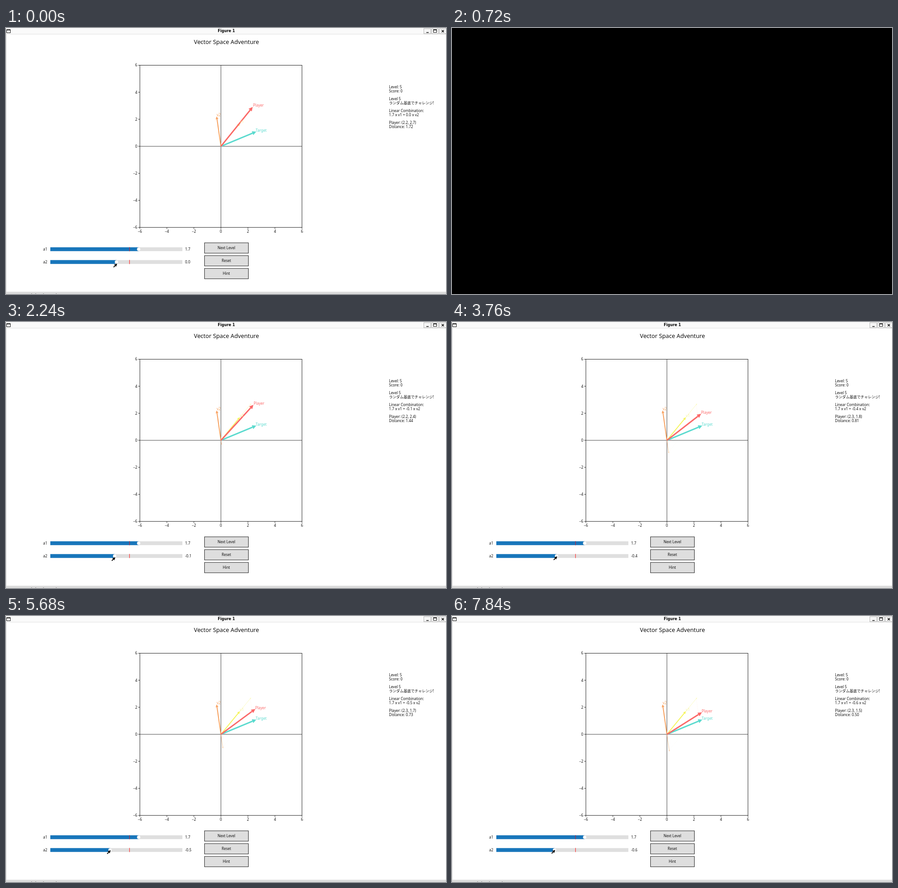
Write an HTML page with a canvas that moves like this. It is 963 px wide and 582 px high and loops after 8000 ms.

```html
<!DOCTYPE html>
<html lang="en">
<head>
<meta charset="utf-8">
<title>Vector sliders</title>
<style>
html, body { margin: 0; width: 100%; height: 100%; overflow: hidden; background: #fff; }
canvas { display: block; }
</style>
</head>
<body>
<canvas id="stage" width="963" height="582"></canvas>
<script>
const ctx = document.getElementById('stage').getContext('2d');
const SANS = '"Noto Sans", "Noto Sans CJK JP", "Noto Sans CJK", sans-serif';
const LOOP = 8000, STEP = 80;
const CORAL = '#fb6868', TEAL = '#5adace', ORANGE = '#f8a05e', YELLOW = '#f5f560';

// Plot geometry: origin and pixels per unit
const OX = 470.4, OY = 258.9, UNIT = 29.57;
const px = x => OX + x * UNIT;
const py = y => OY - y * UNIT;

const a1 = 1.7;
const v1 = [1.2765, 1.5535], v2 = [-0.29, 2.015], target = [2.34, 0.97];

// Each drag of the second slider: start, end, value reached
const drags = [
  [1840, 2080, -0.1177],
  [3120, 3440, -0.4276],
  [4880, 5040, -0.4673],
  [6000, 6320, -0.581]
];

function sliderValue(t) {
  let value = 0.02;
  for (const [start, end, goal] of drags) {
    const k = Math.min(1, Math.max(0, (t - start + STEP) / (end - start + STEP)));
    value += (goal - value) * k;
  }
  return value;
}

function text(str, x, y, { size = 8, align = 'left', color = '#111', font = SANS, weight = 400 } = {}) {
  ctx.font = `${weight} ${size}px ${font}`;
  ctx.textAlign = align;
  ctx.fillStyle = color;
  ctx.fillText(str, x, y);
}

function rect(x, y, w, h, fill, stroke) {
  if (fill) { ctx.fillStyle = fill; ctx.fillRect(x, y, w, h); }
  if (stroke) { ctx.strokeStyle = stroke; ctx.lineWidth = 1; ctx.strokeRect(x, y, w, h); }
}

function line(x1, y1, x2, y2, color, width = 1) {
  ctx.strokeStyle = color;
  ctx.lineWidth = width;
  ctx.beginPath();
  ctx.moveTo(x1, y1);
  ctx.lineTo(x2, y2);
  ctx.stroke();
}

function shape(points, fill) {
  ctx.beginPath();
  points.forEach(([x, y]) => ctx.lineTo(x, y));
  ctx.closePath();
  ctx.fillStyle = fill;
  ctx.fill();
}

// The head starts where the vector ends, so the tip lies beyond it
function arrow([x, y], color, width, head, alpha = 1) {
  const len = Math.hypot(x, y);
  if (len < 0.05) return;
  const ux = x / len, uy = y / len, h = head / 2;
  ctx.globalAlpha = alpha;
  line(OX, OY, px(x), py(y), color, width);
  shape([
    [px(x + ux * head), py(y + uy * head)],
    [px(x - uy * h), py(y + ux * h)],
    [px(x + uy * h), py(y - ux * h)]
  ], color);
  ctx.globalAlpha = 1;
}

const label = (str, [x, y], color) => text(str, px(x * 1.1), py(y * 1.1), { color });

function drawWindow() {
  rect(0, 0, 963, 582, '#fff');
  rect(0, 0, 963, 13, '#fafafa');
  rect(0, 13, 963, 1, '#e2e2e2');
  rect(0, 13, 1, 569, '#d8d8d8');
  rect(0, 577, 963, 5, '#dcdcdc');
  for (const x of [55, 64, 81, 109]) rect(x, 581, 2, 1, '#888');
  rect(1.5, 3.5, 8, 7, '#fff', '#111');
  rect(1, 3, 9, 2, '#111');
  text('Figure 1', 482.3, 9.3, { align: 'center', color: '#000', weight: 700, font: '"DejaVu Sans", sans-serif' });
  for (const x of [914.5, 931.5, 948.5]) rect(x, 1.5, 15, 11, '#f6f6f6', '#b5b5b5');
  rect(920, 9, 5, 1.5, '#111');
  rect(935.5, 3.5, 7, 6, null, '#111');
  rect(935, 3, 8, 2, '#111');
  line(953.5, 4.5, 958.5, 9.5, '#111', 1.5);
  line(958.5, 4.5, 953.5, 9.5, '#111', 1.5);
  text('Vector Space Adventure', 482.5, 35.3, { size: 12.75, align: 'center' });
}

function drawAxes() {
  line(px(-6), OY, px(6), OY, '#444');
  line(OX, py(-6), OX, py(6), '#444');
  rect(293, 81.5, 354.8, 354.8, null, '#222');
  for (let n = -6; n <= 6; n += 2) {
    const str = String(n).replace('-', '−');
    line(px(n), 436.5, px(n), 439.5, '#222');
    line(289.5, py(n), 293, py(n), '#222');
    text(str, px(n), 447.8, { align: 'center' });
    text(str, 287.3, py(n) + 3, { align: 'right' });
  }
}

const knobX = value => 241.5 + value * 28.9;

function drawSlider(name, value, y) {
  const x = knobX(value);
  rect(97, y - 4.2, 289, 8.4, '#dfdfdf');
  rect(97, y - 4.2, x - 97, 8.4, '#1876bb');
  line(knobX(1), y - 4.4, knobX(1), y + 4.4, value > 1 ? '#c0283c' : '#f33', 1.2);
  ctx.beginPath();
  ctx.arc(x, y, 3.8, 0, Math.PI * 2);
  ctx.fillStyle = '#fff';
  ctx.fill();
  ctx.strokeStyle = '#d8d8d8';
  ctx.lineWidth = 0.7;
  ctx.stroke();
  text(name, 90.3, y + 2.7, { align: 'right' });
  text(value.toFixed(1), 392, y + 2.7);
}

function drawButtons() {
  ['Next Level', 'Reset', 'Hint'].forEach((name, i) => {
    const y = 470 + i * 28;
    rect(434.5, y, 96, 22.7, '#dedede', '#222');
    text(name, 482.3, y + 14, { align: 'center' });
  });
}

function drawVectors(a2, player) {
  const part1 = v1.map(c => c * a1), part2 = v2.map(c => c * a2);
  ctx.globalAlpha = 0.15;
  ctx.setLineDash([2, 2]);
  for (const [[x, y], color] of [[part1, ORANGE], [part2, '#d8d8a0']])
    line(px(x), py(y), px(player[0]), py(player[1]), color, 0.8);
  ctx.setLineDash([]);
  ctx.globalAlpha = 1;
  arrow(v1, YELLOW, 2, 0.2);
  arrow(v2, ORANGE, 2, 0.2);
  arrow(part1, YELLOW, 1, 0.1, 0.4);
  arrow(part2, ORANGE, 1, 0.1, 0.6);
  arrow(target, TEAL, 3, 0.3);
  arrow(player, CORAL, 3, 0.3);
  label('v1', v1, '#f6f3a0');
  label('v2', v2, ORANGE);
  label('Target', target, TEAL);
  label('Player', player, CORAL);
}

function drawInfo(a2, [x, y]) {
  const distance = Math.hypot(x - target[0], y - target[1]);
  [
    'Level: 5', 'Score: 0', '',
    'Level 5', 'ランダム基底でチャレンジ!', '',
    'Linear Combination:', `${a1} x v1 + ${a2.toFixed(1)} x v2`, '',
    `Player: (${x.toFixed(1)}, ${y.toFixed(1)})`,
    `Distance: ${distance.toFixed(2)}`
  ].forEach((str, i) => text(str, 838.3, 132.4 + i * 8.63));
}

function drawCursor(a2) {
  const x = knobX(a2);
  ctx.save();
  ctx.translate(x + 0.7, 516 - (242 - x) * 0.21);
  line(-2, 2, -7.3, 7.3, '#fff', 3);
  line(-2, 2, -7.3, 7.3, '#000', 1.8);
  shape([[0.5, -0.5], [-6.5, 1.8], [-3.6, 3.6], [-1.8, 6.5]], '#000');
  ctx.restore();
}

function draw(t) {
  if (t >= 720 && t < 800) return rect(0, 0, 963, 582, '#000');
  const a2 = sliderValue(t);
  const player = v1.map((c, i) => c * a1 + v2[i] * a2);
  drawWindow();
  drawAxes();
  drawVectors(a2, player);
  drawInfo(a2, player);
  drawSlider('a1', a1, 484);
  drawSlider('a2', a2, 512);
  drawButtons();
  drawCursor(a2);
}

const begin = performance.now();
function tick() {
  const t = (performance.now() - begin) % LOOP;
  draw(Math.floor(t / STEP) * STEP);
  requestAnimationFrame(tick);
}
tick();
</script>
</body>
</html>
```
